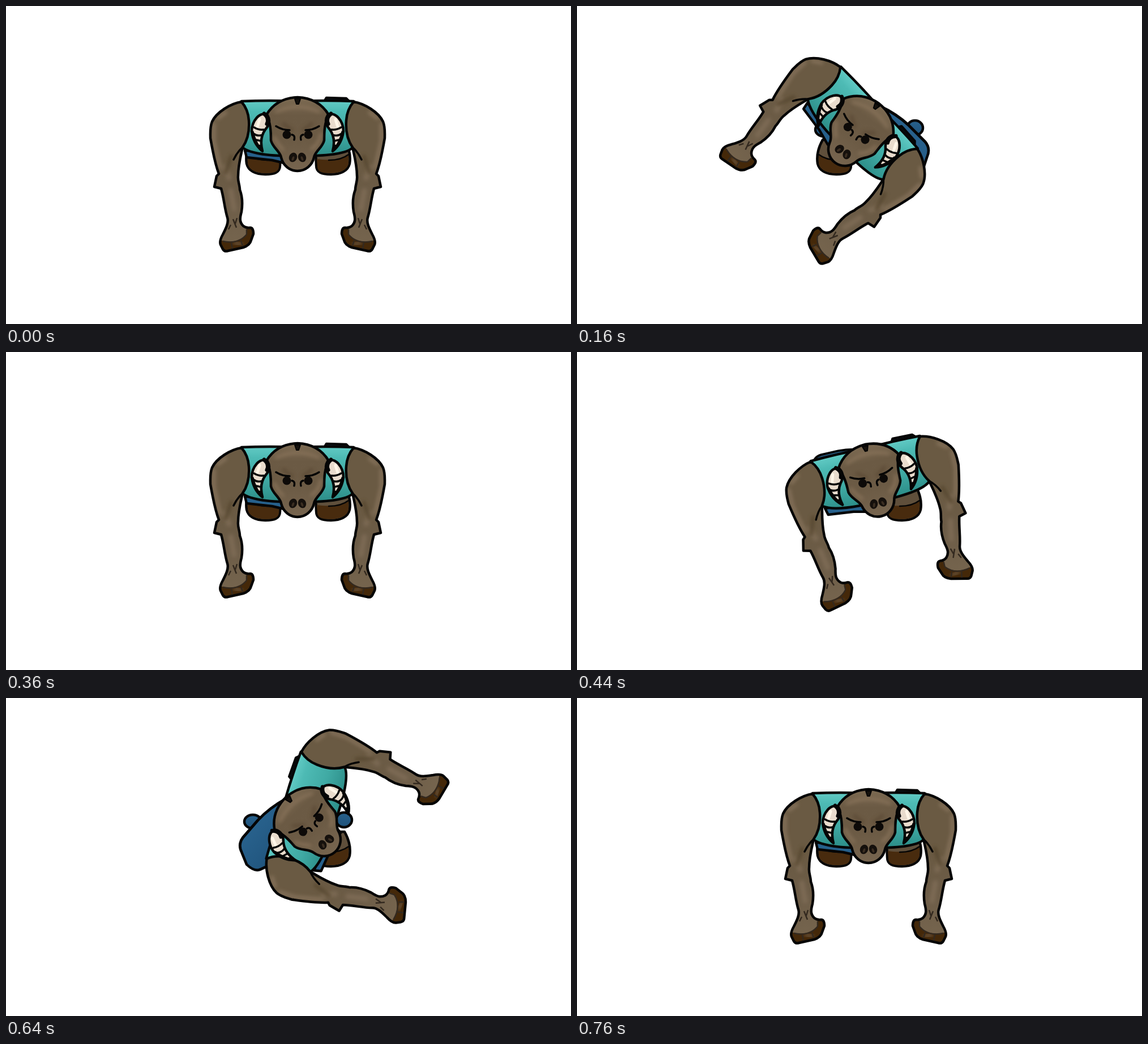
These frames come from a looping animation (998 by 561 pixels, 0.8 s). An HTML page:

```html
<!DOCTYPE html>
<html lang="en">
<head>
<meta charset="utf-8">
<title>Bull swing</title>
<style>
  html, body { margin: 0; width: 100%; height: 100%; overflow: hidden; background: #fff; }
  svg { display: block; width: 100vw; height: 100vh; }
  .ink { stroke: #050505; stroke-width: 4.5; stroke-linejoin: round; stroke-linecap: round; }
  .line { fill: none; }
  .soft { fill: none; stroke-linecap: round; filter: url(#blur); }
</style>
</head>
<body>
<svg viewBox="0 0 998 561">
  <defs>
    <filter id="blur" x="-60%" y="-60%" width="220%" height="220%"><feGaussianBlur stdDeviation="3"/></filter>
    <linearGradient id="skin" x1="0" y1="0" x2="0" y2="1">
      <stop offset="0" stop-color="#6a5a43"/>
      <stop offset=".4" stop-color="#6a5a43"/>
      <stop offset=".65" stop-color="#6c5c47"/>
      <stop offset="1" stop-color="#77664f"/>
    </linearGradient>
    <linearGradient id="face" x1="0" y1="0" x2="0" y2="1">
      <stop offset="0" stop-color="#7d6b53"/>
      <stop offset=".25" stop-color="#6b5a44"/>
      <stop offset=".6" stop-color="#6c5b45"/>
      <stop offset="1" stop-color="#77654f"/>
    </linearGradient>
    <linearGradient id="shirt" x1="0" y1="0" x2="0" y2="1">
      <stop offset="0" stop-color="#62cbc5"/>
      <stop offset=".2" stop-color="#4dbab4"/>
      <stop offset=".6" stop-color="#40aaa4"/>
      <stop offset="1" stop-color="#2c8d88"/>
    </linearGradient>
    <linearGradient id="denim" x1="0" y1="0" x2="0" y2="1">
      <stop offset="0" stop-color="#28618c"/>
      <stop offset="1" stop-color="#1f527a"/>
    </linearGradient>

    <g id="foot">
      <path class="ink" fill="#5f4f3b" d="M434 236C426 250 423 265 425 278C428 291 441 297 458 297C475 297 484 293 484 281L485 258L468 236Z"/>
      <path fill="#482b0e" d="M427 263C437 271 460 273 483 270L482 284C481 294 470 295 457 295C441 294 429 289 427 278Z"/>
      <path class="soft" stroke="#65411b" stroke-width="6" d="M460 277V287"/>
      <path class="ink line" style="stroke-width:2.5" d="M427 262Q440 272 462 272"/>
    </g>

    <path id="armShape" d="M416 169C397 172 372 187 364 204C360 214 361 224 361 233C365 256 369 278 376 296L372 300L368 319L380 322C385 339 386 357 391 373C394 382 388 393 383 403C379 410 377 416 379 421L383 429Q386 434 392 432L419 426Q431 422 433 413L437 402Q437 391 431 391Q424 392 419 388C412 381 413 374 416 363C418 350 418 337 413 324C413 316 409 309 410 300C410 281 415 263 418 249C428 235 430 216 429 202C428 186 423 177 416 169Z"/>
    <clipPath id="armClip"><use href="#armShape"/></clipPath>
    <g id="arm">
      <use href="#armShape" fill="url(#skin)"/>
      <g clip-path="url(#armClip)">
        <path class="soft" stroke="#8a765e" stroke-width="5" d="M367 208V238L378 285M388 188L374 198"/>
        <path class="soft" stroke="#7d6b55" stroke-width="9" d="M386 284L394 303M397 326L403 358"/>
        <path class="soft" stroke="#57472f" stroke-width="6" d="M398 265L388 294"/>
        <path fill="#442809" d="M374 412L387 415C399 418 416 412 424 405L425 388H440V420L426 428L390 437L374 425Z"/>
        <path class="soft" stroke="#6f5a42" stroke-width="5" d="M404 418L415 420"/>
      </g>
      <use class="ink line" href="#armShape"/>
      <path class="ink line" style="stroke-width:3.5" d="M418 249Q408 258 402 271"/>
      <path class="line" stroke="#33291f" stroke-width="2.5" d="M401 376L407 391M408 374L405 384M397 386L393 394M383 415Q410 421 425 403M425 403V394M398 418L400 428M415 414L418 423"/>
    </g>

    <g id="horn">
      <path class="ink" fill="#e9dccd" d="M462 193C448 184 434 204 434 221C436 237 444 249 453 256C449 241 450 229 458 218C465 210 467 201 462 193Z"/>
      <path class="line" stroke="#fff6e8" stroke-width="5" stroke-linecap="round" d="M448 200L444 213"/>
      <path class="ink line" style="stroke-width:3.5" d="M438 214Q446 219 455 218M437 225Q444 230 451 228M441 236L450 238M446 246L451 247M436 222Q440 240 450 252"/>
      <path class="ink line" style="stroke-width:7" d="M456 190Q466 198 461 208"/>
    </g>
    <g id="brow">
      <path class="ink line" style="stroke-width:3.5" d="M477 212Q488 219 501 219M505 227Q511 228 509 236"/>
      <circle cx="496" cy="227" r="7.5" fill="#0d0a08"/>
      <ellipse cx="507" cy="267" rx="7" ry="8.5" fill="#15100c" transform="rotate(20 507 267)"/>
      <ellipse cx="507" cy="269" rx="2" ry="4" fill="#3b2e22" transform="rotate(20 507 269)"/>
    </g>
    <path id="skull" d="M460 192C472 172 491 162 515 161C539 162 558 172 570 192C563 205 562 220 562 237C559 250 546 256 544 267C541 281 529 291 515 291C501 291 489 281 486 267C484 256 471 250 468 237C468 220 467 205 460 192Z"/>
  </defs>

  <rect width="998" height="561" fill="#fff"/>
  <g id="leftFoot"><use href="#foot"/></g>
  <g id="rightFoot"><use href="#foot" transform="matrix(-1 0 0 1 1032 0)"/></g>
  <g class="ink" fill="url(#denim)">
    <ellipse cx="436" cy="218" rx="15" ry="12"/>
    <ellipse cx="597" cy="215" rx="14" ry="13"/>
  </g>
  <g id="hips">
    <path class="ink" fill="url(#denim)" d="M-60 0L0 -26Q30 -36 60 -37L100 -37Q116 -36 122 -22L132 -4Q133 14 122 18L95 29L40 40H-50Z"/>
  </g>
  <g id="body">
    <path class="ink" fill="#26608b" d="M422 255L425 267L470 272L500 279L510 260Z"/>
    <path class="ink" fill="#10283a" d="M563 167L566 162L601 163L606 168Z"/>
    <path class="ink" fill="url(#shirt)" d="M416 168Q466 166 515 168Q564 166 614 168L612 250Q600 262 548 264H482Q435 262 418 250Z"/>
    <use href="#arm"/>
    <use href="#arm" transform="matrix(-1 0 0 1 1030 0)"/>
  </g>
  <g id="head">
    <use href="#skull" class="ink" fill="url(#face)"/>
    <path class="soft" stroke="#8f785e" stroke-width="5" opacity=".75" d="M478 186Q515 170 552 186M474 232Q481 245 489 253M556 226Q553 244 540 252"/>
    <path class="soft" stroke="#55432f" stroke-width="6" opacity=".6" d="M490 208L505 219M540 208L525 219"/>
    <path class="ink" style="stroke-width:2" fill="#15110d" d="M510 164H520L517 173H513Z"/>
    <use href="#brow"/>
    <use href="#brow" transform="matrix(-1 0 0 1 1030 0)"/>
    <use href="#horn"/>
    <use href="#horn" transform="matrix(-1 0 0 1 1030 0)"/>
  </g>
</svg>
<script>
  const LOOP = 800, STEP = 40;
  const [hips, body, head, leftFoot, rightFoot] =
    ["hips", "body", "head", "leftFoot", "rightFoot"].map(id => document.getElementById(id));

  // [ms, degrees]
  const bodyKeys = [[0, 0], [80, 25], [240, 68.4], [280, 68.4], [360, 0], [400, 0],
    [480, -26], [560, -51.5], [640, -72], [680, -72], [760, 0], [800, 0]];
  const headKeys = [[0, 0], [80, 24], [160, 36], [240, 28], [280, 28], [360, 0], [400, 0],
    [560, -52], [640, -41], [680, -41], [760, 0], [800, 0]];

  function sample(keys, t) {
    const i = keys.findIndex(k => k[0] > t);
    const [t0, a] = keys[i - 1], [t1, b] = keys[i];
    return a + (b - a) * (t - t0) / (t1 - t0);
  }

  const move = (el, value) => el.setAttribute("transform", value);
  const show = (el, on) => el.setAttribute("visibility", on ? "visible" : "hidden");

  function draw(ms) {
    const t = Math.floor(ms % LOOP / STEP) * STEP;
    const turn = sample(bodyKeys, t);
    const nod = sample(headKeys, t);
    const drop = Math.min(3, Math.abs(turn) * .12);

    // the hips stop short of the full turn and show on the lower side only
    const hip = Math.max(-49, Math.min(45, turn));
    const open = Math.abs(hip);
    const side = turn < 0 ? -1 : 1;
    const sx = side * Math.min(1, .7 + open * .007);
    const sy = Math.min(1.1, .65 + open * .018);
    move(hips, `translate(515 ${194 + drop}) rotate(${hip}) scale(${sx} ${sy})`);
    move(body, `translate(0 ${drop}) rotate(${turn} 515 194)`);
    move(head, `translate(${-nod * .12} ${Math.abs(nod) * .09}) rotate(${nod} 515 198)`);
    show(leftFoot, turn >= 0);
    show(rightFoot, turn <= 0);
  }

  const start = performance.now();
  function tick() {
    draw(performance.now() - start);
    requestAnimationFrame(tick);
  }
  draw(0);
  requestAnimationFrame(tick);
</script>
</body>
</html>
```
